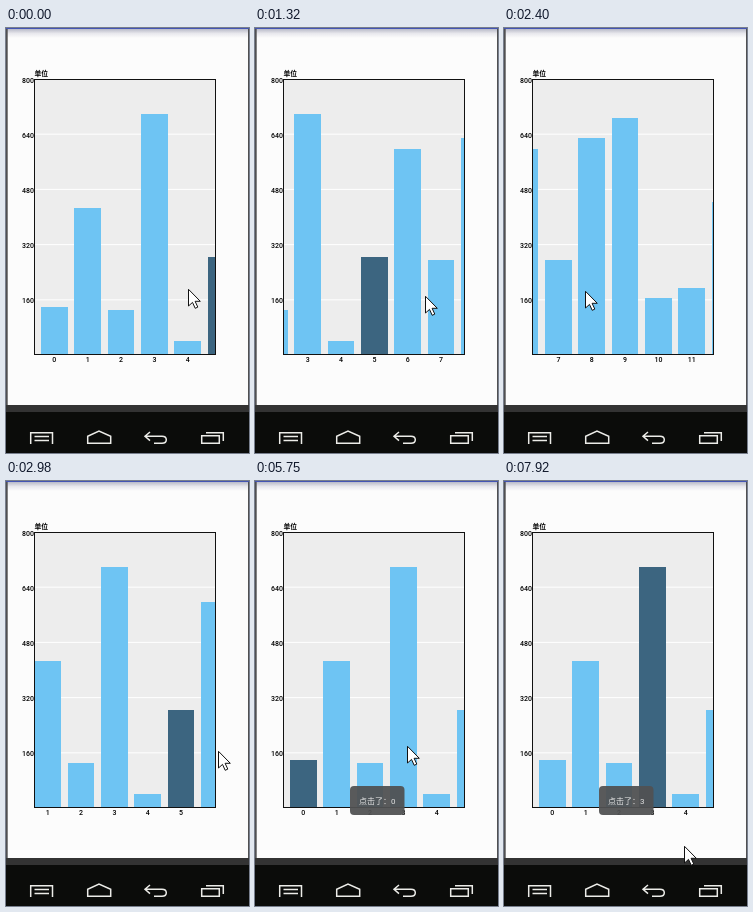
Recreate the animation shown at these times as an HTML page. Size 243 px wide and 425 px high, loop 8000 ms.

```html
<!DOCTYPE html>
<html lang="zh">
<head>
<meta charset="utf-8">
<title>Scrolling bar chart</title>
<style>
  html, body { margin: 0; width: 100%; height: 100%; overflow: hidden; background: #fcfcfc; }
  svg { display: block; width: 243px; height: 425px; }
  text { font-family: Roboto, "Noto Sans CJK SC", "Noto Sans CJK", sans-serif; }
  .label { font-size: 7px; font-weight: 500; fill: #000; }
  .scale { text-anchor: end; }
  .mid { text-anchor: middle; }
  .crisp { shape-rendering: crispEdges; }
  .bar { fill: #6ec4f3; }
  .bar.on { fill: #3c6580; }
  .icons { fill: none; stroke: #ecece8; stroke-width: 1.5; }
</style>
</head>
<body>
<svg viewBox="0 0 243 425">
  <defs>
    <linearGradient id="shade" x2="0" y2="1">
      <stop offset="0" stop-color="#b8bac8"/>
      <stop offset=".5" stop-color="#e8e8ed"/>
      <stop offset="1" stop-color="#fcfcfc"/>
    </linearGradient>
    <clipPath id="plot"><rect x="29" y="51" width="181" height="276"/></clipPath>
  </defs>

  <rect width="243" height="425" fill="#fcfcfc"/>
  <rect y="1" width="243" height="9" fill="url(#shade)"/>
  <rect width="243" height="1" fill="#4455b4"/>
  <rect y="1" width="1.7" height="377" fill="#505052"/>
  <rect x="242" y="1" width="1" height="377" fill="#505052"/>
  <rect y="377" width="243" height="7" fill="#333"/>
  <rect y="384" width="243" height="41" fill="#0b0c0a"/>
  <g class="icons">
    <path d="M24.7 416V404.7H46.5V416M28.5 408.5H43M28.5 412.5H43"/>
    <path d="M81.7 415.3V408.3L93 403L104.7 408.3V415.3Z"/>
    <path d="M144 404L139 408.3L144 412.6M139.5 408.3H156Q160.3 408.3 160.3 411.8T156 415.3H148"/>
    <path d="M195.7 407.7H213.3V415.3H195.7ZM200 404.7H217.3V413"/>
  </g>

  <rect x="28" y="51" width="182" height="276" fill="#ededed"/>
  <g id="grid"></g>
  <g id="bars" class="crisp" clip-path="url(#plot)"></g>
  <rect class="crisp" x="28.5" y="51.5" width="181" height="275" fill="none" stroke="#111"/>
  <text class="label" x="28.5" y="47.6" style="font-size: 6.8px; font-weight: 700">单位</text>
  <g id="names"></g>

  <g id="toast">
    <rect x="95" y="305" width="54.5" height="29" rx="4" fill="#505152" fill-opacity=".94"/>
    <text id="message" x="104" y="323" font-size="8" fill="#e4e4e4"></text>
  </g>
  <path id="cursor" d="M.5 .3V17L4.5 13.4L7.2 19.3L9.8 18.1L7.1 12.3H12.3Z"
        fill="#fff" stroke="#111" stroke-linejoin="round"/>
</svg>

<script>
const LOOP = 8000, TICK = 136;
const FIRST = 35, PITCH = 33.35, BAR = 26.7, BASE = 327, UNIT = 0.345;
const values = [138, 426, 129, 699, 42, 284, 596, 274, 630, 687, 164, 193, 443];

// Key points in ticks: when, then the values reached
const pointer = [
  [0, 182, 261], [6, 112, 265], [10, 170, 268], [18, 81, 263], [22, 212, 270], [25, 231, 272],
  [31, 87, 282], [37, 48, 310], [42, 152, 265], [51, 152, 265], [55, 207, 320], [58, 180, 365]
];
const scroll = [[0, 0], [6, 95.7], [10, 95.7], [18, 227.4], [22, 40], [25, 0]];
const fade = [[38, 0], [42, 1], [52, 1], [54, 0], [57, 1]];

const $ = id => document.getElementById(id);

function add(parent, tag, attrs, text = "") {
  const node = document.createElementNS("http://www.w3.org/2000/svg", tag);
  for (const key in attrs) node.setAttribute(key, attrs[key]);
  node.textContent = text;
  return parent.appendChild(node);
}

// Eased value between the two neighbouring key points
function at(keys, n, i = 1) {
  const next = keys.findIndex(k => k[0] > n);
  if (next < 0) return keys.at(-1)[i];
  if (next === 0) return keys[0][i];
  const a = keys[next - 1], b = keys[next];
  const p = (n - a[0]) / (b[0] - a[0]);
  return a[i] + (b[i] - a[i]) * (1 - Math.cos(Math.PI * p)) / 2;
}

for (let value = 160; value <= 800; value += 160) {
  const y = BASE - value * UNIT;
  if (value < 800) add($("grid"), "path", { d: `M29 ${y}H209`, stroke: "#fff" });
  add($("grid"), "text", { class: "label scale", x: 28, y: y + 3.6 }, value);
}

const bars = values.map(v => {
  const height = Math.round(v * UNIT);
  return add($("bars"), "rect", { y: BASE - height, width: BAR, height });
});
const names = values.map((_, i) => add($("names"), "text", { class: "label mid", y: 333.7 }, i));

function draw(ms) {
  const n = Math.floor(ms / TICK + 0.35);
  const shift = at(scroll, n);
  const selected = n < 37 ? 5 : n < 47 ? 0 : 3;

  bars.forEach((bar, i) => {
    const x = FIRST + i * PITCH - shift, mid = x + BAR / 2;
    bar.setAttribute("x", x);
    bar.setAttribute("class", i === selected ? "bar on" : "bar");
    names[i].setAttribute("x", mid);
    names[i].setAttribute("visibility", mid >= 28.5 && mid < 207 ? "visible" : "hidden");
  });

  $("message").textContent = "点击了：" + (n < 54 ? 0 : 3);
  $("toast").setAttribute("opacity", at(fade, n));
  $("cursor").setAttribute("transform", `translate(${at(pointer, n)} ${at(pointer, n, 2)})`);
}

const begin = performance.now();
function tick() {
  draw((performance.now() - begin) % LOOP);
  requestAnimationFrame(tick);
}
tick();
</script>
</body>
</html>
```
